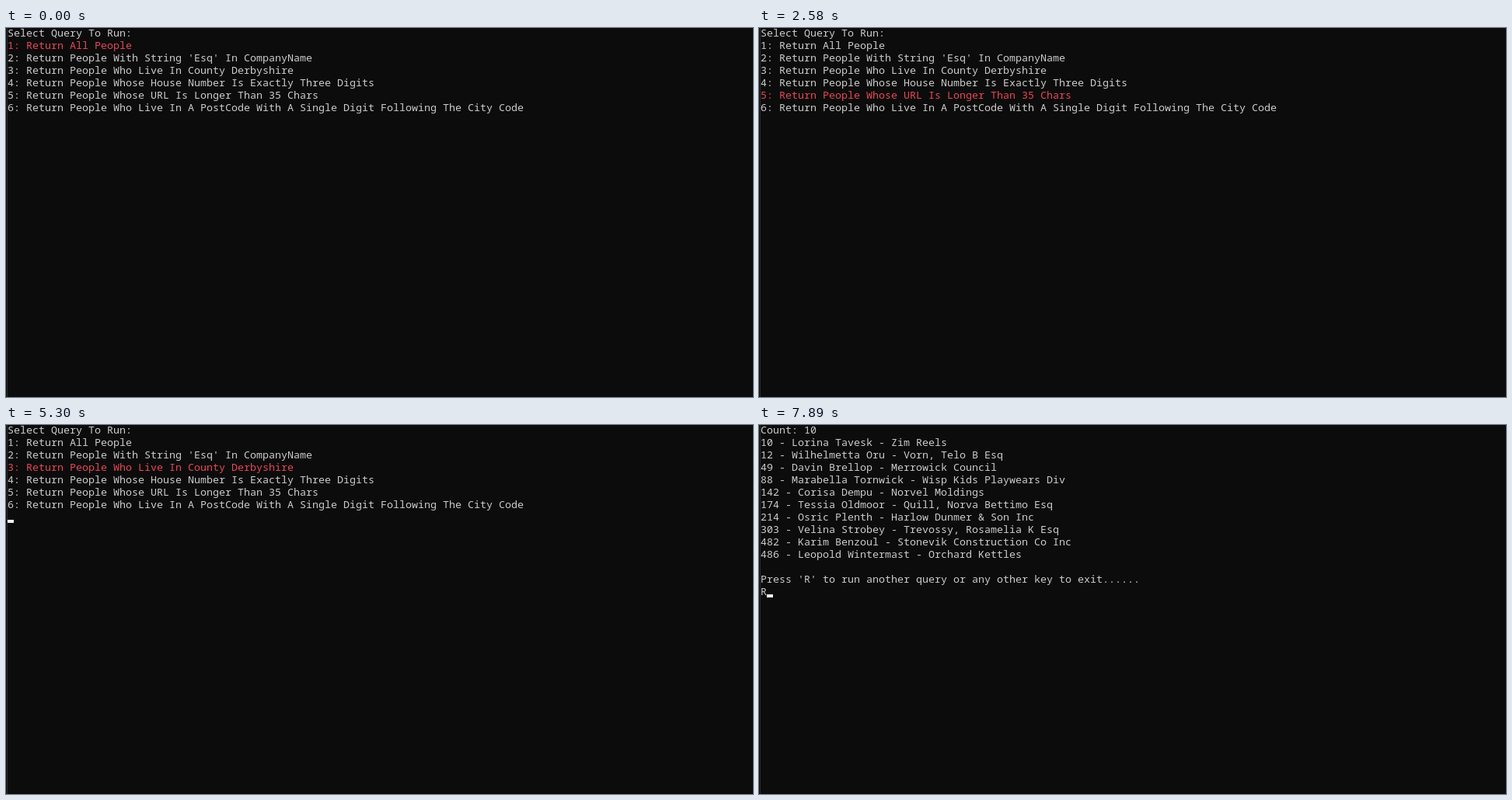
Write an HTML page with a canvas that moves like this. It is 961 px wide and 475 px high and loops after 8000 ms.

```html
<!DOCTYPE html>
<html lang="en">
<head>
<meta charset="utf-8">
<title>Query console</title>
<style>
html, body { margin: 0; width: 100%; height: 100%; overflow: hidden; background: #0c0c0c; }
canvas { display: block; }
</style>
</head>
<body>
<canvas id="stage" width="961" height="475"></canvas>
<script>
const ctx = document.getElementById('stage').getContext('2d', { alpha: false });
const LOOP = 8000;
const CELL = 8, ROW = 16, LEFT = 2, BASE = 11;
const BACK = '#0c0c0c', TEXT = '#cccccc', RED = '#e74856', CURSOR = '#f2f2f2', EDGE = '#2e2e2e';

const menu = [
  'Select Query To Run:',
  '1: Return All People',
  "2: Return People With String 'Esq' In CompanyName",
  '3: Return People Who Live In County Derbyshire',
  '4: Return People Whose House Number Is Exactly Three Digits',
  '5: Return People Whose URL Is Longer Than 35 Chars',
  '6: Return People Who Live In A PostCode With A Single Digit Following The City Code'
];

const results = [
  'Count: 10',
  '10 - Lorina Tavesk - Zim Reels',
  '12 - Wilhelmetta Oru - Vorn, Telo B Esq',
  '49 - Davin Brellop - Merrowick Council',
  '88 - Marabella Tornwick - Wisp Kids Playwears Div',
  '142 - Corisa Dempu - Norvel Moldings',
  '174 - Tessia Oldmoor - Quill, Norva Bettimo Esq',
  '214 - Osric Plenth - Harlow Dunmer & Son Inc',
  '303 - Velina Strobey - Trevossy, Rosamelia K Esq',
  '482 - Karim Benzoul - Stonevik Construction Co Inc',
  '486 - Leopold Wintermast - Orchard Kettles',
  '',
  "Press 'R' to run another query or any other key to exit......"
];

// [start ms, selected menu line]
const picks = [[0, 1], [1190, 2], [1720, 3], [2120, 4], [2580, 5], [3510, 4], [4040, 3]];
const SUBMIT = 5300, SHOW = 5370, TYPED = 7890;
const blinks = [6100, 6570, 7170, 7630];

function print(line, row, color) {
  ctx.fillStyle = color;
  [...line].forEach((ch, i) => {
    if (ch !== ' ') ctx.fillText(ch, LEFT + i * CELL, BASE + row * ROW);
  });
}

function cursor(col, row) {
  ctx.fillStyle = CURSOR;
  ctx.fillRect(LEFT + col * CELL, BASE + row * ROW - 1, CELL, 4);
}

function drawMenu(t) {
  const selected = picks.filter(p => p[0] <= t).pop()[1];
  menu.forEach((line, i) => print(line, i, i === selected ? RED : TEXT));
  if (t >= SUBMIT) cursor(0, menu.length);
}

function drawResults(t) {
  const row = results.length;
  const typed = t >= TYPED;
  results.forEach((line, i) => print(line, i, TEXT));
  if (typed) print('R', row, TEXT);
  if (blinks.filter(b => b <= t).length % 2 === 0) cursor(typed ? 1 : 0, row);
}

function draw(t) {
  ctx.fillStyle = BACK;
  ctx.fillRect(0, 0, 961, 475);
  ctx.fillStyle = EDGE;
  ctx.fillRect(1, 0, 1, 475);
  ctx.font = '13.3333px "Noto Sans Mono", "DejaVu Sans Mono", monospace';
  ctx.textBaseline = 'alphabetic';
  if (t < SHOW) drawMenu(t);
  else drawResults(t);
}

const start = performance.now();
function tick() {
  draw((performance.now() - start) % LOOP);
  requestAnimationFrame(tick);
}
tick();
</script>
</body>
</html>
```
